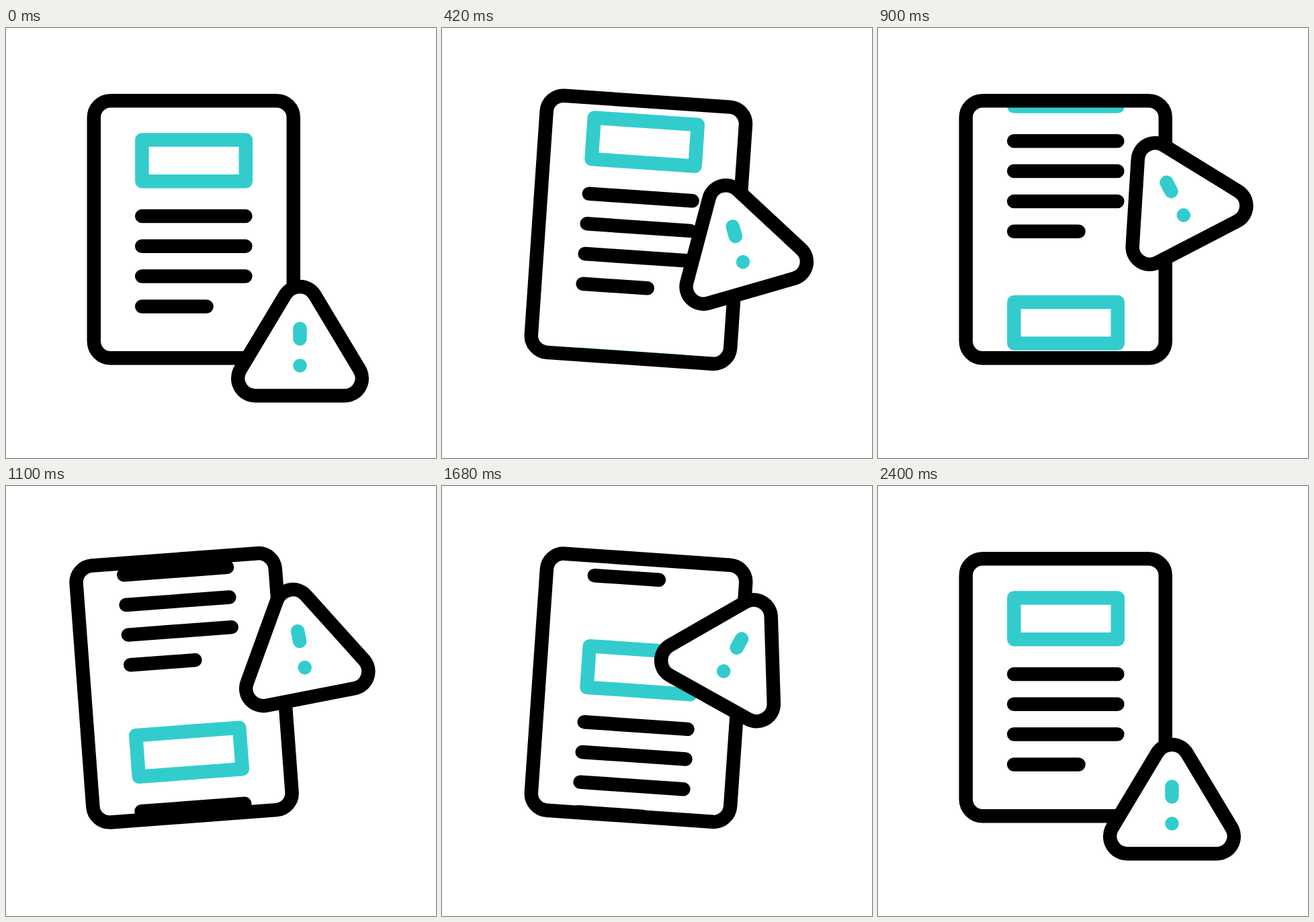
Animation, 640 px wide and 640 px high, one loop 2420 ms. Source, as an HTML page:

```html
<!DOCTYPE html>
<html lang="en">
<head>
<meta charset="utf-8">
<title>Document alert</title>
<style>
  html, body { margin: 0; width: 100%; height: 100%; overflow: hidden; background: #fff; }
  svg { display: block; width: 100vw; height: 100vh; }
  .line { fill: none; stroke: #000; stroke-width: 20.5; stroke-linecap: round; stroke-linejoin: round; }
  .teal { stroke: #3cc; }
  .white { fill: #fff; }
</style>
</head>
<body>
<svg viewBox="0 0 640 640">
  <defs>
    <clipPath id="page"><rect x="130.8" y="108.3" width="297" height="383" rx="25"/></clipPath>
    <g id="text" class="line">
      <rect class="teal" x="202.4" y="166.6" width="154.4" height="61.7"/>
      <path d="M202.2 280H356.4M202.2 324.8H356.4M202.2 369.6H356.4M202.2 414.4H298.6"/>
    </g>
  </defs>
  <g id="doc">
    <g clip-path="url(#page)">
      <g id="scroll">
        <use href="#text"/>
        <use href="#text" y="353"/>
      </g>
    </g>
    <rect class="line" x="130.8" y="108.3" width="297" height="383" rx="25"/>
  </g>
  <g id="sign">
    <path class="line white" d="M348.8 508.4L415.5 397.3A25.7 25.7 0 0 1 459.5 397.3L526.2 508.4A25.7 25.7 0 0 1 504.2 547.2H370.8A25.7 25.7 0 0 1 348.8 508.4Z"/>
    <path class="line teal" d="M437.5 447.6V462.6M437.5 502.6h.01"/>
  </g>
</svg>
<script>
  const LOOP = 2420, END = 2400, PAGE = 353, LIFT = -233.5;
  const el = id => document.getElementById(id);
  const doc = el('doc'), scroll = el('scroll'), sign = el('sign');

  const smooth = u => u * u * (3 - 2 * u);

  // Cubic timing curve, solved for x by bisection
  function bezier(x1, y1, x2, y2) {
    const at = (s, a, b) => 3 * (1 - s) * (1 - s) * s * a + 3 * (1 - s) * s * s * b + s * s * s;
    return u => {
      let lo = 0, hi = 1;
      for (let i = 0; i < 30; i++) {
        const mid = (lo + hi) / 2;
        if (at(mid, x1, x2) < u) lo = mid; else hi = mid;
      }
      return at((lo + hi) / 2, y1, y2);
    };
  }

  const rise = bezier(0.126, 0.6, 0.667, 1);
  const fall = bezier(0.667, 0, 0.954, 0.3);

  // Evenly spaced keys over the whole run
  function keys(t, values, ease) {
    const n = values.length - 1;
    const p = t / END * n;
    const i = Math.min(Math.floor(p), n - 1);
    return values[i] + (values[i + 1] - values[i]) * ease(p - i);
  }

  function lift(t) {
    if (t >= END) return 0;
    const u = t / 1200;
    return LIFT * (u < 1 ? rise(u) : 1 - fall(u - 1));
  }

  function draw(now) {
    const t = Math.min(now % LOOP, END);
    const tilt = keys(t, [0, 5, -5, 5, 0], smooth);
    const swing = keys(t, [0, -30, 30, 0], smooth);
    doc.setAttribute('transform', `rotate(${tilt} 279.3 491.3)`);
    scroll.setAttribute('transform', `translate(0 ${-PAGE * smooth(t / END)})`);
    sign.setAttribute('transform', `translate(0 ${lift(t)}) rotate(${swing} 437.5 465)`);
  }

  let start;
  function tick(now) {
    if (start === undefined) start = now;
    draw(now - start);
    requestAnimationFrame(tick);
  }
  draw(0);
  requestAnimationFrame(tick);
</script>
</body>
</html>
```
